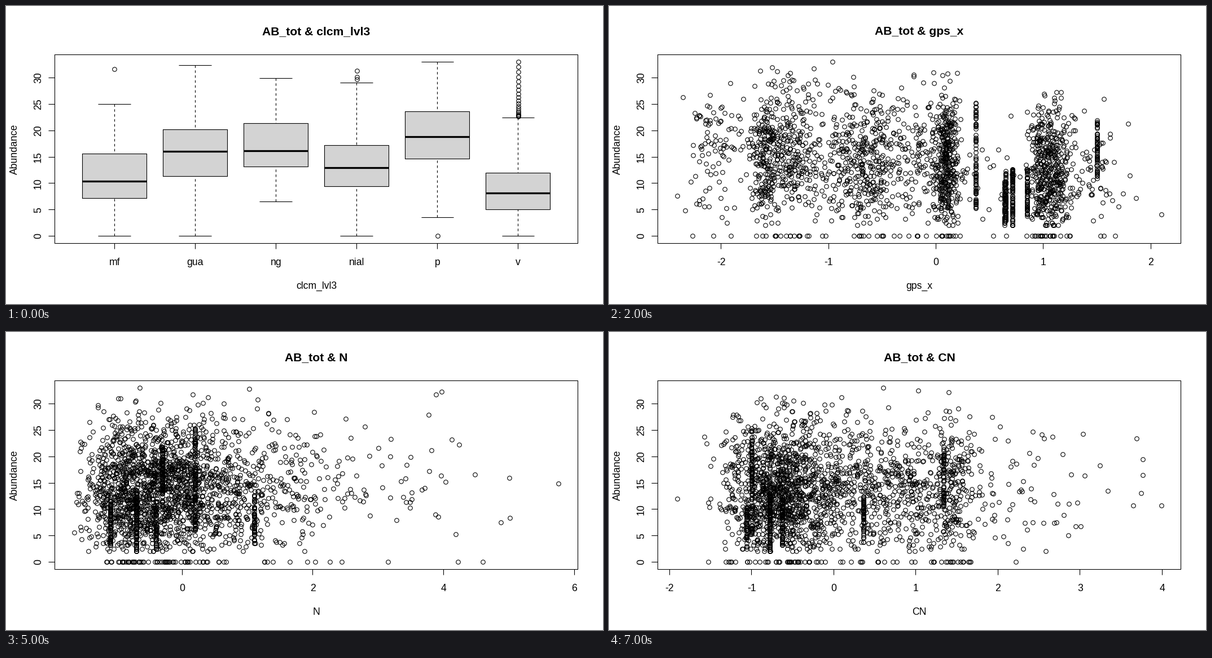
Animation of 1058 by 529 pixels, one loop 8000 ms. Source, as a matplotlib script:

```python
import numpy as np
import matplotlib.pyplot as plt
from matplotlib.animation import FuncAnimation

W, H, DPI = 1058, 529, 64
PX = 72 / DPI                 # one pixel in points
TEXT = 17.58
LEFT, TOP, RIGHT, BOTTOM = 86, 86, 1013, 421
TICK = 10.5
XMIN, XMAX = 121, 979         # pixels of the data extremes
Y0, YUNIT = 408.4, 9.36
YMAX = 33.1
STEP = 2.05                   # abundances lie on STEP * sqrt(k / 2)
BODY, ZEROS = 2080, 75        # scattered points, and how many of them are empty

plt.rcParams["font.family"] = "Liberation Sans"
fig = plt.figure(figsize=(W / DPI, H / DPI), dpi=DPI, facecolor="white")
ax = fig.add_axes([0, 0, 1, 1])

# name, (low, q1, median, q3, high), outliers
BOXES = [
    ("mf", (0, 7.1, 10.33, 15.55, 25), [31.7]),
    ("gua", (0, 11.35, 15.97, 20.2, 32.4), []),
    ("ng", (6.5, 13.1, 16.07, 21.4, 29.9), []),
    ("nial", (0, 9.4, 12.9, 17.2, 29), [29.7, 30.2, 31.3]),
    ("p", (3.55, 14.6, 18.75, 23.65, 33), [0]),
    ("v", (0, 5, 8.15, 12, 22.4), 22.7 + 10.4 * np.linspace(0, 1, 19) ** 1.8),
]

# Sites sampled many times show as vertical strips: (count, low y, high y)
SITES = [(85, 1.9, 13), (65, 2.8, 12.5), (50, 2.2, 10.5),
         (80, 5, 25.5), (55, 10.5, 22), (50, 3.5, 13)]

# hubs: (x, spread, weight); sites: x of each site; trend: mean y per unit of x
PLOTS = [
    dict(name="CaCO3", lim=(-1.102, 3.849), ticks=range(-1, 5), trend=-2,
         hubs=[(-.95, .28, .44), (-.45, .33, .27), (.2, .25, .12),
               (1.1, .5, .13), (2.2, .8, .04)],
         sites=[2.83, .065, 2.6, .745, -.68, .72]),
    dict(name="gps_x", lim=(-2.408, 2.098), ticks=range(-2, 3), trend=-1.2,
         hubs=[(-2.05, .15, .05), (-1.6, .06, .09), (-1.35, .14, .14),
               (-.7, .2, .18), (-.1, .25, .1), (.1, .06, .16),
               (.95, .04, .08), (1.1, .07, .14), (1.2, .35, .06)],
         sites=[.71, .65, .64, .37, 1.5, .85]),
    dict(name="gps_y", lim=(-1.975, 1.75), ticks=range(-2, 2), trend=.5,
         hubs=[(-1.5, .3, .15), (-.7, .4, .25), (.2, .3, .22),
               (.9, .25, .3), (1.4, .2, .08)],
         sites=[.62, -1.3, -.55, .18, .95, -.2]),
    dict(name="P", lim=(-3.23, 2.545), ticks=range(-3, 3), trend=0,
         hubs=[(-1.5, .55, .22), (-.4, .28, .25), (.15, .25, .19),
               (.7, .23, .22), (1.35, .25, .08), (0, 1.3, .04)],
         sites=[.505, .09, 2.265, 1.54, -1.475, -.27]),
    dict(name="N", lim=(-1.65, 5.756), ticks=range(0, 7, 2), trend=.5,
         hubs=[(-.9, .35, .3), (-.2, .5, .45), (.8, .8, .2), (2.5, 1.3, .05)],
         sites=[-.7, -1.1, -.4, .2, -.3, 1.1]),
    dict(name="bio4", lim=(-3.61, 2.08), ticks=range(-3, 3), trend=-1.2,
         hubs=[(-3, .15, .02), (-2.4, .1, .03), (-1.85, .2, .1),
               (-1.1, .22, .16), (-.15, .18, .23), (.08, .06, .1),
               (.45, .25, .12), (1.17, .08, .18), (1.2, .35, .06)],
         sites=[.32, .3, 1.27, .62, -.245, 1.25]),
    dict(name="CN", lim=(-1.907, 3.99), ticks=range(-2, 5), trend=0,
         hubs=[(-.9, .25, .28), (-.5, .2, .22), (.05, .38, .2),
               (.9, .3, .14), (1.45, .12, .06), (1.5, .9, .1)],
         sites=[-.78, -.63, -1.06, -1, 1.34, .36]),
]


def ypix(value):
    return Y0 - YUNIT * np.asarray(value)


def line(xs, ys, width=1.1, **style):
    """A crisp line through pixel centres."""
    ax.plot(np.floor(xs) + .5, np.floor(ys) + .5, color="black", lw=width * PX,
            snap=False, solid_capstyle="butt", **style)


def label(x, y, text, size=TEXT, **style):
    ax.text(x, y, text, fontsize=size * PX, ha="center", va="baseline",
            rotation_mode="anchor", **style)


def circles(xs, ys):
    ax.plot(xs, ys, "o", ms=7.5 * PX, mfc="none", mec="black", mew=1.1 * PX)


def quantise(y):
    return STEP * np.sqrt(np.round(2 * (y / STEP) ** 2) / 2)


def sample(plot, seed):
    """Points scattered around the hubs, plus the strips of the sites."""
    rng = np.random.default_rng(seed)
    lo, hi = plot["lim"]
    centre, spread, weight = np.array(plot["hubs"]).T
    pick = rng.choice(len(weight), 2 * BODY, p=weight / weight.sum())
    x = rng.normal(centre[pick], spread[pick])
    y = rng.normal(13.7 + plot["trend"] * x, 6.6)
    keep = (x > lo) & (x < hi) & (y > 2) & (y < YMAX)
    x, y = x[keep][:BODY], quantise(y[keep][:BODY])
    y[:ZEROS] = 0
    y[y.argmax()] = YMAX
    x[x.argmin()], x[x.argmax()] = lo, hi
    for site, (n, low, high) in zip(plot["sites"], SITES):
        x = np.append(x, np.full(n, site))
        y = np.append(y, quantise(rng.uniform(low, high, n)))
    return x, y


def draw_frame(name, ticks):
    """Box, axes and titles; ticks are (pixel, text) pairs."""
    line([LEFT, RIGHT, RIGHT, LEFT, LEFT], [TOP, TOP, BOTTOM, BOTTOM, TOP],
         solid_joinstyle="miter")
    for x, text in ticks:
        line([x, x], [BOTTOM, BOTTOM + TICK])
        label(x, 459.6, text)
    for value in range(0, 31, 5):
        y = ypix(value)
        line([LEFT - TICK, LEFT], [y, y])
        label(62, y, str(value), rotation=90)
    label(550, 51, "AB_tot & " + name, 1.2 * TEXT, weight="bold")
    label(550, 501.8, name)
    label(20, 254, "Abundance", rotation=90)


def draw_boxes():
    centres = [192.4 + 143.06 * i for i in range(len(BOXES))]
    for x, (_, stats, outliers) in zip(centres, BOXES):
        low, q1, median, q3, high = ypix(stats)
        for end, edge in ((low, q1), (high, q3)):
            line([x, x], [end, edge], linestyle=(0, (4, 4)), dash_capstyle="butt")
            line([x - 28.6, x + 28.6], [end, end])
        l, r = x - 57.2, x + 57.2
        ax.fill([l, r, r, l], [q1, q1, q3, q3], fc="lightgray", ec="none")
        line([l, r], [median, median], 3.3)
        line([l, r, r, l, l], [q1, q1, q3, q3, q1])
        circles([x] * len(outliers), ypix(outliers))
    draw_frame("clcm_lvl3", [(x, box[0]) for x, box in zip(centres, BOXES)])


def draw_scatter(plot, points):
    lo, hi = plot["lim"]

    def xpix(value):
        return XMIN + (value - lo) * (XMAX - XMIN) / (hi - lo)

    circles(xpix(points[0]), ypix(points[1]))
    draw_frame(plot["name"], [(xpix(t), str(t)) for t in plot["ticks"]])


POINTS = [sample(plot, seed) for seed, plot in enumerate(PLOTS)]


def update(i):
    ax.clear()
    ax.set(xlim=(0, W), ylim=(H, 0))
    ax.axis("off")
    if i == 0:
        draw_boxes()
    else:
        draw_scatter(PLOTS[i - 1], POINTS[i - 1])
    return []


anim = FuncAnimation(fig, update, frames=len(PLOTS) + 1, interval=1000,
                     repeat=True, repeat_delay=0)
plt.show()
```
